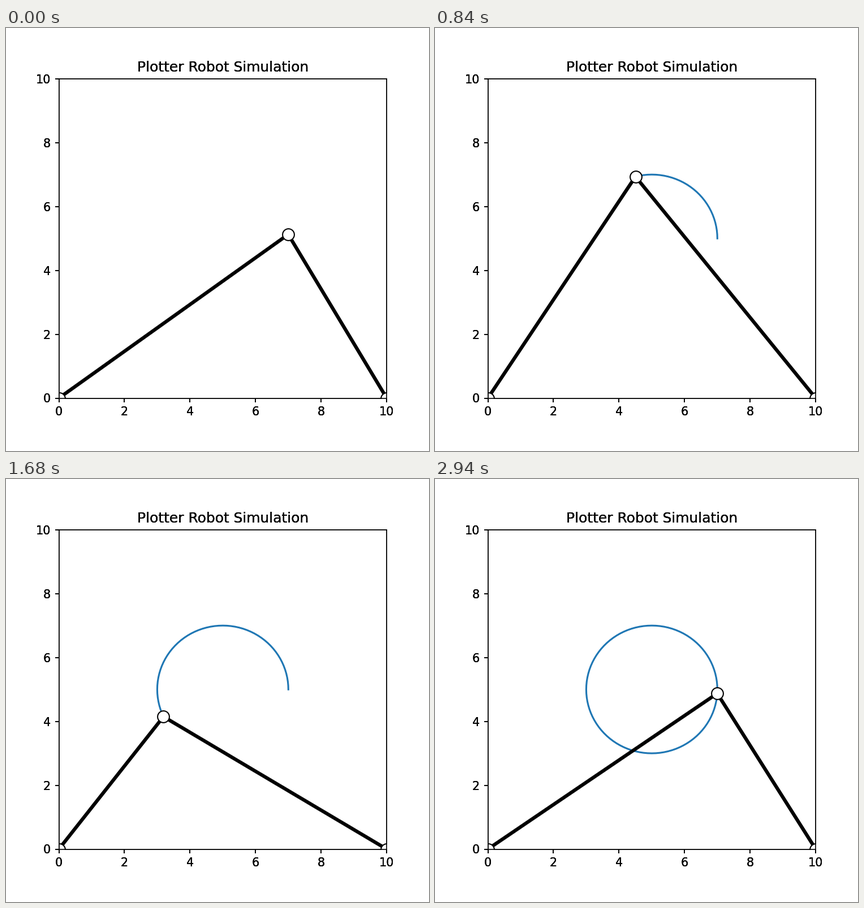
Write a matplotlib script that moves like this. It is 748 by 748 pixels and loops after 3000 ms.

```python
import numpy as np
import matplotlib.pyplot as plt
from matplotlib.animation import FuncAnimation

SIDE, INCHES = 748, 5
FRAMES, INTERVAL = 50, 60
CENTER, RADIUS = 5, 2
LEFT_BASE, RIGHT_BASE = (0, 0), (10, 0)

plt.rcParams["font.family"] = "DejaVu Sans"
fig = plt.figure(figsize=(INCHES, INCHES), dpi=SIDE / INCHES, facecolor="white")


def add_plot():
    ax = fig.add_axes([0.125, 0.125, 0.775, 0.755])
    ax.set(xlim=(0, 10), ylim=(0, 10), title="Plotter Robot Simulation",
           xticks=range(0, 11, 2), yticks=range(0, 11, 2))
    return ax


# Stacked copies give the hard-edged, heavy lettering; the last one holds the robot.
ax = [add_plot() for _ in range(3)][-1]

angles = np.linspace(0, 2 * np.pi, 2 * FRAMES + 1)
path_x = CENTER + RADIUS * np.cos(angles)
path_y = CENTER + RADIUS * np.sin(angles)

trace, = ax.plot([], [], color="C0", lw=1.5)
arms, = ax.plot([], [], "o-", color="black", lw=3, ms=10,
                mfc="white", mec="black", mew=1)


def update(frame):
    tip = 2 * frame + 1
    trace.set_data(path_x[:tip + 1], path_y[:tip + 1])
    arms.set_data([LEFT_BASE[0], path_x[tip], RIGHT_BASE[0]],
                  [LEFT_BASE[1], path_y[tip], RIGHT_BASE[1]])
    return trace, arms


anim = FuncAnimation(fig, update, frames=FRAMES, interval=INTERVAL,
                     repeat=True, repeat_delay=0)
plt.show()
```
